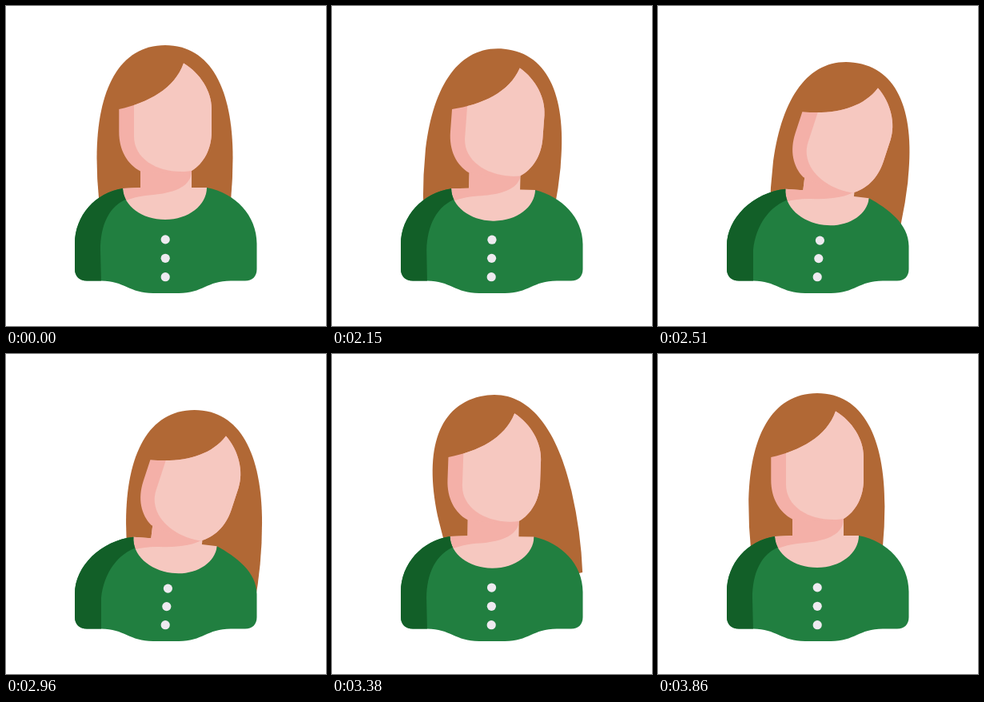
Animation, 400 px wide and 400 px high, one loop 3.89 s. Source, as an HTML page with a canvas:

```html
<!DOCTYPE html>
<html lang="en">
<head>
<meta charset="utf-8">
<title>Tilting head</title>
<style>
  html, body { margin: 0; width: 100%; height: 100%; overflow: hidden; background: #fff; }
  canvas { display: block; width: 100vmin; height: 100vmin; }
</style>
</head>
<body>
<canvas id="stage" width="400" height="400"></canvas>
<script>
const ctx = document.getElementById('stage').getContext('2d');
const LOOP = 3890, TILT = 1990, RETURN = 2990;
const RAD = Math.PI / 180;
const HAIR = '#b16835', SKIN = '#f6c8c0', SHADE = '#f4b0a8';
const GREEN = '#217f40', DARK = '#125f28', BUTTON = '#eeeaf0';

const hair = new Path2D(
  'M124 292Q113.5 242 113.5 190C113.5 104 142 49 199 49' +
  'S283.5 104 283.5 190Q283.5 242 274 292Z');
const face = new Path2D(
  'M141.3 129C178 121 211 103 222 71.5C243 84 257 107 257 128V157' +
  'C257 179 247 197 232 206Q200 211 168 206.5C152 198 141.3 181 141.3 157Z');
const faceLight = new Path2D('M160 60V163C160 190 187 207 219 207H234L270 200V60Z');
const neck = new Path2D('M146 228L168 227V200H232V227H251V258L228 272H170L146 258Z');

const ease = u => (1 - Math.cos(Math.PI * Math.min(1, Math.max(0, u)))) / 2;
const tiltAt = t => ease((t - TILT) / 500) - ease((t - RETURN) / 500);

// Hair trails behind the head, swings past, then settles (degrees).
const swing = t => 13 * ease(t / 350) - 18 * ease((t - 400) / 300) + 5 * ease((t - 700) / 190);
const swingAt = t => swing(t - TILT) - swing(t - RETURN);

function fill(path, color) {
  ctx.fillStyle = color;
  ctx.fill(path);
}

function fillInside(mask, path, color) {
  ctx.save();
  ctx.clip(mask);
  fill(path, color);
  ctx.restore();
}

function spin(x, y, degrees) {
  ctx.translate(x, y);
  ctx.rotate(degrees * RAD);
  ctx.translate(-x, -y);
}

// Runs a drawing step with its own moved and turned axes.
function moved(dx, dy, x, y, degrees, step) {
  ctx.save();
  ctx.translate(dx, dy);
  spin(x, y, degrees);
  step();
  ctx.restore();
}

const inHead = (s, step) => moved(12 * s, 17.2 * s, 199, 207, 18.1 * s, step);
const inNeck = (s, step) => moved(13 * s, 7 * s, 199, 228, 6.8 * s, step);

// Where a neckline point stands on the stage.
function collar(s, x, y) {
  const a = 6.8 * s * RAD, c = Math.cos(a), n = Math.sin(a);
  const u = x - 199, v = y - 228;
  return [199 + 13 * s + u * c - v * n, 228 + 7 * s + u * n + v * c];
}

function drawHair(s, angle) {
  inHead(s, () => {
    spin(199, 128, angle - 18.1 * s);
    fill(hair, HAIR);
  });
}

function drawNeck(s) {
  const shadow = new Path2D(
    `M232 ${207 + 14 * s}C${231 - 7 * s} 228 205 234 184 236` +
    'C170 237 160 239 148 244L140 225L160 190H232Z');
  inNeck(s, () => {
    fill(neck, SKIN);
    fillInside(neck, shadow, SHADE);
  });
}

function drawFace(s) {
  inHead(s, () => {
    fill(face, SHADE);
    fillInside(face, faceLight, SKIN);
  });
}

function drawBlouse(s) {
  const at = (x, y) => collar(s, x, y).join(' ');
  const blouse = new Path2D(
    `M${at(146, 228)}C${112 + 7 * s} 233 86 ${262 + 3 * s} 86 ${297 + 3 * s}` +
    'V329C86 338 92 343.5 101 343.5H119C148 343.5 154 359 184 359' +
    'H216C246 359 251 343.5 281 343.5H299C308 343.5 313.5 338 313.5 329' +
    `V${297 + 3 * s}C313.5 ${262 + 10 * s} 287 ${234 + 19 * s} ${at(251, 227)}` +
    `C${at(251, 249)} ${at(228, 267)} ${at(199, 267)}` +
    `C${at(170, 267)} ${at(147, 250)} ${at(146, 228)}Z`);
  const side = new Path2D(
    `M${154 + 12 * s} ${240 + s}C${128 + 11 * s} 249 ${118 + 4 * s} 275 ${118 + s} 305` +
    `L119 346L80 350V220H${150 + 15 * s}Z`);
  fill(blouse, GREEN);
  fillInside(blouse, side, DARK);

  for (let i = 0; i < 3; i++) {
    ctx.beginPath();
    ctx.arc(199.2 + 1.6 * i * s, 338.7 - 23.4 * i + 0.3 * i * i * s, 5.6, 0, Math.PI * 2);
    ctx.fillStyle = BUTTON;
    ctx.fill();
  }
}

function draw(t) {
  const s = tiltAt(t);
  ctx.fillStyle = '#fff';
  ctx.fillRect(0, 0, 400, 400);
  drawHair(s, swingAt(t));
  drawNeck(s);
  drawFace(s);
  drawBlouse(s);
}

const start = performance.now();
function frame() {
  draw((performance.now() - start) % LOOP);
  requestAnimationFrame(frame);
}
frame();
</script>
</body>
</html>
```
